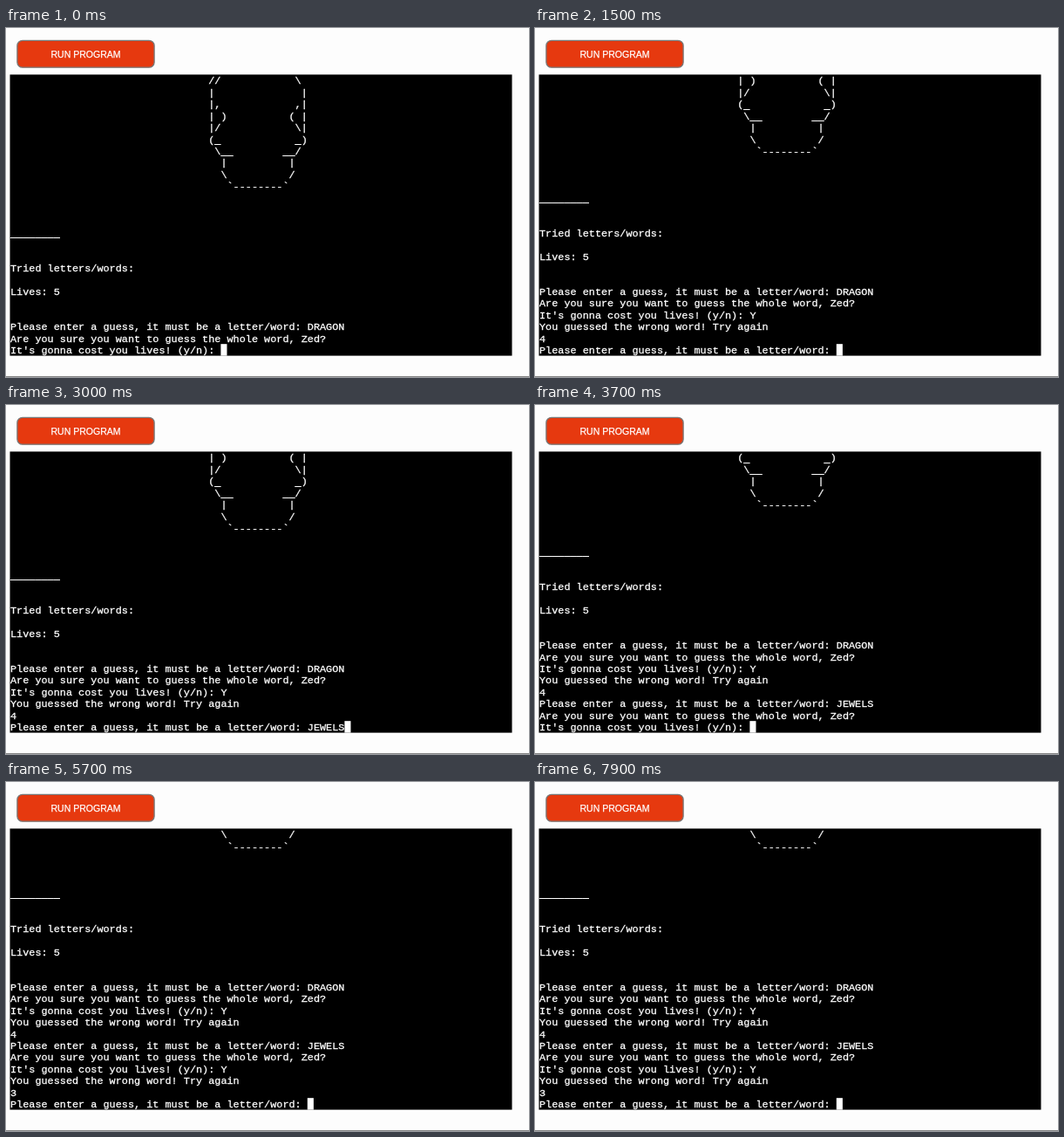
An HTML page with a canvas that plays this animation: 600x400 px, repeating every 8000 ms.

```html
<!DOCTYPE html>
<html lang="en">
<head>
<meta charset="utf-8">
<title>Word guessing terminal</title>
<style>
  html, body { margin: 0; width: 100%; height: 100%; overflow: hidden; background: #fdfdfd; }
  canvas { display: block; }
</style>
</head>
<body>
<canvas id="stage" width="600" height="400"></canvas>
<script>
const ctx = document.getElementById("stage").getContext("2d");
const LOOP = 8000;
const TERM = { x: 4.5, y: 53.4, w: 576, h: 322.2, rows: 24, hiddenRows: 40 };
const CELL = { w: 7.1, h: TERM.h / TERM.rows };
const TEXT_X = 5;
const BASELINE = 11;
const UNDERSCORE_DROP = 1.4;

const ART = [
  "//            \\",
  "|              |",
  "|,            ,|",
  "| )          ( |",
  "|/            \\|",
  "(_            _)",
  " \\__        __/",
  "  |          |",
  "  \\          /",
  "   `--------`",
].map(line => " ".repeat(32) + line).join("\n");

const ASK = "Please enter a guess, it must be a letter/word: ";
const CONFIRM = "\nAre you sure you want to guess the whole word, Zed?" +
  "\nIt's gonna cost you lives! (y/n): ";
const wrong = lives => `\nYou guessed the wrong word! Try again\n${lives}\n${ASK}`;

// Everything the terminal prints, with the time at which it appears.
const OUTPUT = [
  [0, `${ART}\n\n\n\n________\n\n\nTried letters/words:\n\nLives: 5\n\n\n${ASK}DRAGON${CONFIRM}`],
  [900, "Y"], [1500, wrong(4)],
  [1900, "J"], [2200, "E"], [2500, "W"], [2600, "E"], [2800, "L"], [2900, "S"],
  [3700, CONFIRM], [4900, "Y"], [5700, wrong(3)],
];

const ARROW = new Path2D("M373.5 372v12.5l2.8-2.7 2 4.7 2-.9-2-4.4h4z");

function roundBox(x, y, w, h, r) {
  ctx.beginPath();
  ctx.roundRect(x, y, w, h, r);
}

function drawLabel(text, x, y) {
  ctx.fillText(text, x, y);
  ctx.strokeText(text, x, y);
}

function drawPage() {
  ctx.fillStyle = "#fdfdfd";
  ctx.fillRect(0, 0, 600, 400);
  ctx.fillStyle = "#858585";
  ctx.fillRect(0, 399, 600, 1);

  roundBox(12.9, 14.3, 157.2, 30.9, 6);
  ctx.fillStyle = "#e6390f";
  ctx.fill();
  ctx.strokeStyle = "#777";
  ctx.lineWidth = 1.3;
  ctx.stroke();

  ctx.fillStyle = ctx.strokeStyle = "#fff";
  ctx.lineWidth = 0.25;
  ctx.font = '10.5px "Liberation Sans", Arial, sans-serif';
  ctx.textAlign = "center";
  drawLabel("RUN PROGRAM", 91.5, 34);

  ctx.fillStyle = "#000";
  ctx.fillRect(TERM.x, TERM.y, TERM.w, TERM.h);
}

function drawChar(char, col, row) {
  const drop = char === "_" ? UNDERSCORE_DROP : 0;
  ctx.save();
  ctx.translate(TEXT_X + col * CELL.w, TERM.y + row * CELL.h + BASELINE + drop);
  ctx.scale(0.5, 0.5);
  drawLabel(char, 0, 0);
  ctx.restore();
}

function drawText(lines) {
  ctx.fillStyle = ctx.strokeStyle = "#fff";
  ctx.lineWidth = 0.6;
  ctx.textAlign = "left";
  ctx.font = '23.66px "Liberation Mono", "Courier New", monospace';
  lines.forEach((line, row) => [...line].forEach((char, col) => {
    if (char !== " ") drawChar(char, col, row);
  }));
  const last = lines.length - 1;
  ctx.fillRect(TEXT_X + lines[last].length * CELL.w, TERM.y + last * CELL.h, CELL.w, CELL.h);
}

// The scrollbar shows briefly after the text has scrolled.
function drawScrollbar(age, lineCount) {
  if (age < 100 || age >= 700) return;
  const height = TERM.h * TERM.rows / (lineCount + TERM.hiddenRows);
  roundBox(574, 374 - height, 6, height, 3);
  ctx.fillStyle = `rgba(255, 255, 255, ${age < 600 ? 0.5 : 0.25})`;
  ctx.fill();
}

function drawPointer() {
  ctx.fillStyle = "#000";
  ctx.strokeStyle = "#fff";
  ctx.lineWidth = 1;
  ctx.stroke(ARROW);
  ctx.fill(ARROW);
}

function draw(time) {
  const printed = OUTPUT.filter(([start]) => start <= time);
  const lines = printed.map(([, text]) => text).join("").split("\n");
  const scrolls = printed.filter(([start, text]) => start > 0 && text.includes("\n"));

  drawPage();
  drawText(lines.slice(-TERM.rows));
  if (scrolls.length) drawScrollbar(time - scrolls.at(-1)[0], lines.length);
  if (time >= 4700 && time < 4900) drawPointer();
}

function tick() {
  draw(performance.now() % LOOP);
  requestAnimationFrame(tick);
}
tick();
</script>
</body>
</html>
```
